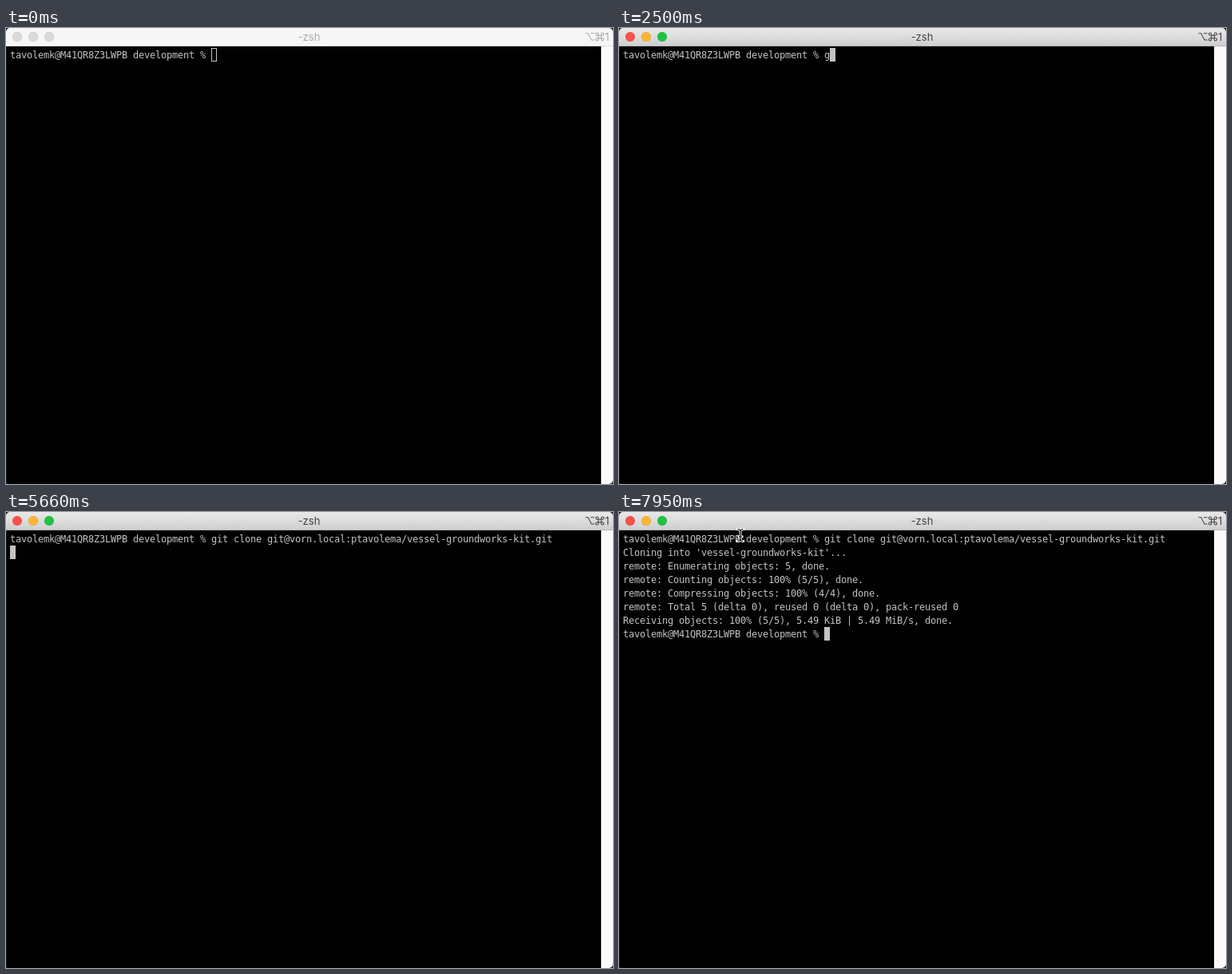
Animation, 760 px wide and 571 px high, one loop 8000 ms. Source, as an HTML page:

```html
<!DOCTYPE html>
<html lang="en">
<head>
<meta charset="utf-8">
<title>Terminal</title>
<style>
  html, body { margin: 0; width: 100%; height: 100%; overflow: hidden; background: #1c1c1c; }
  #win { position: absolute; inset: 0; width: 760px; height: 571px; overflow: hidden;
    background: #010101; border-radius: 5px; --ink: #a9a9a9; }
  #win.active { --ink: #434343; }
  #bar { position: absolute; left: 0; top: 0; width: 760px; height: 23px; box-sizing: border-box;
    background: #f6f6f6; border-bottom: 1px solid #dcdcdc; color: var(--ink);
    font: 13px/23px Inter, Roboto, sans-serif; }
  .active #bar { background: linear-gradient(#e9e9e9, #cfcfcf); border-color: #b4b4b4; }
  #bar i { position: absolute; top: 5px; width: 12px; height: 12px; border-radius: 50%;
    background: #dadada; left: calc(8px + 20px * var(--n)); box-shadow: inset 0 0 0 .5px #0002; }
  .active #bar i { background: var(--c); }
  #title { position: absolute; left: 0; width: 759px; text-align: center; }
  #bar svg { position: absolute; left: 0; top: 0; }
  #keys { fill: none; stroke: var(--ink); stroke-width: 1.05; }
  #keys text { fill: var(--ink); stroke: none; font: 13px Inter, Roboto, sans-serif; }
  #scroll { position: absolute; left: 745px; top: 23px; width: 14px; bottom: 0;
    background: #fafafa; border-left: 1px solid #e6e6e6; }
  #edge { position: absolute; left: 0; top: 23px; width: 1px; bottom: 0; background: #1d1d1d; }
  #screen { position: absolute; left: 5px; top: 26px; margin: 0; color: #c3c3c3; white-space: pre;
    font: 12px/17px "DejaVu Sans Mono", "Noto Sans Mono", monospace; font-variant-ligatures: none; }
  #screen span { display: inline-block; height: 16px; margin-top: -1px; padding-top: 1px;
    vertical-align: top; background: #c3c3c3; color: #000; }
  #caret { position: absolute; width: 7px; height: 17px; box-sizing: border-box; border: 1px solid #c3c3c3; }
  #caret.solid { background: #c3c3c3; }
  #mouse { position: absolute; left: -10px; top: -12px; fill: none; }
</style>
</head>
<body>
<div id="win">
  <pre id="screen"></pre>
  <div id="caret"></div>
  <div id="edge"></div>
  <div id="scroll"></div>
  <div id="bar">
    <i style="--n:0;--c:#fc504c"></i><i style="--n:1;--c:#fdb434"></i><i style="--n:2;--c:#1ec344"></i>
    <div id="title">-zsh</div>
    <svg width="760" height="22">
      <g id="keys">
        <path d="M725.5 6.8h3.3l4.2 8.2h3.8M732 6.8h4.8"/>
        <path d="M741.7 9.2v3.6M745.3 9.2v3.6M741.7 9.2h3.6M741.7 12.8h3.6
          M741.7 9.2h-1.6a1.6 1.6 0 1 1 1.6-1.6z M745.3 9.2v-1.6a1.6 1.6 0 1 1 1.6 1.6z
          M741.7 12.8v1.6a1.6 1.6 0 1 1-1.6-1.6z M745.3 12.8h1.6a1.6 1.6 0 1 1-1.6 1.6z"/>
        <text x="750" y="15.5">1</text>
      </g>
    </svg>
  </div>
  <svg id="mouse" width="20" height="24" viewBox="-10 -12 20 24">
    <defs><path id="beam" d="M-3.5-7.5Q0-7.5 0-4.5V4.5Q0 7.5-3.5 7.5M3.5-7.5Q0-7.5 0-4.5M0 4.5Q0 7.5 3.5 7.5M-2 2H2"/></defs>
    <use href="#beam" stroke="#fff" stroke-width="3" stroke-linecap="square"/>
    <use href="#beam" stroke="#000" stroke-width="1.2"/>
  </svg>
</div>
<script>
const LOOP = 8000, CELL = 7, ROW = 17;
const FOCUS = 1000, CARET_ON = 1200, PASTE = 4000, ENTER = 5660, PROMPT = 6330;
const repo = 'vessel-groundworks-kit';
const url = `git@vorn.local:ptavolema/${repo}.git`;
const prompt = 'tavolemk@M41QR8Z3LWPB development % ';
const command = 'git clone ';
const keyTimes = [2490, 2610, 2730, 2890, 3080, 3200, 3330, 3410, 3530, 3680];
const output = [
  [5790, `Cloning into '${repo}'...`],
  [6160, 'remote: Enumerating objects: 5, done.'],
  [6160, 'remote: Counting objects: 100% (5/5), done.'],
  [6200, 'remote: Compressing objects: 100% (4/4), done.'],
  [6250, 'remote: Total 5 (delta 0), reused 0 (delta 0), pack-reused 0'],
  [6250, 'Receiving objects: 100% (5/5), 5.49 KiB | 5.49 MiB/s, done.'],
];
// Pointer paths: [time, x, y]; the pointer hides while typing.
const paths = [
  { from: 540, to: 2490, points: [[540, 392, 500], [800, 368, 400], [1160, 347, 311], [1330, 347, 337]] },
  { from: 6830, to: LOOP, points: [[6830, 347, 337], [6900, 345, 345], [7000, 325, 320],
    [7290, 159, 70], [7500, 163, 32], [7750, 168, 22], [7950, 152, 29]] },
];

const $ = id => document.getElementById(id);
const win = $('win'), screen = $('screen'), caret = $('caret'), mouse = $('mouse');

// Fit the font's advance to the terminal cell grid.
function fitGrid() {
  const probe = document.createElement('span');
  probe.textContent = 'm'.repeat(100);
  screen.append(probe);
  screen.style.letterSpacing = CELL - probe.getBoundingClientRect().width / 100 + 'px';
  probe.remove();
}

function pointAt(points, t) {
  const next = points.findIndex(p => p[0] > t);
  if (next < 0) return points.at(-1).slice(1);
  const [t0, x0, y0] = points[next - 1], [t1, x1, y1] = points[next];
  const u = (t - t0) / (t1 - t0), k = u * u * (3 - 2 * u);
  return [x0 + (x1 - x0) * k, y0 + (y1 - y0) * k];
}

function linesAt(t) {
  const typed = command.slice(0, keyTimes.filter(k => k <= t).length);
  const lines = [prompt + typed + (t >= PASTE ? url : '')];
  if (t < ENTER) return lines;
  for (const [at, text] of output) if (t >= at) lines.push(text);
  lines.push(t >= PROMPT ? prompt : '');
  return lines;
}

let shown = '';
function drawText(t) {
  const lines = linesAt(t), selected = t >= PASTE && t < ENTER;
  const text = lines.join('\n'), key = selected + text;
  if (key !== shown) {
    shown = key;
    if (selected) {
      const mark = document.createElement('span');
      mark.textContent = url;
      screen.replaceChildren(prompt + command, mark);
    } else screen.textContent = text;
  }
  caret.style.left = 5 + lines.at(-1).length * CELL + 'px';
  caret.style.top = 25 + (lines.length - 1) * ROW + 'px';
  caret.className = t >= CARET_ON ? 'solid' : '';
}

function drawPointer(t) {
  const path = paths.find(p => t >= p.from && t < p.to);
  mouse.style.display = path ? '' : 'none';
  if (!path) return;
  const [x, y] = pointAt(path.points, t);
  mouse.style.transform = `translate(${Math.round(x)}px, ${Math.round(y)}px)`;
}

const start = performance.now();
function frame() {
  const t = (performance.now() - start) % LOOP;
  win.className = t >= FOCUS ? 'active' : '';
  drawText(t);
  drawPointer(t);
  requestAnimationFrame(frame);
}
fitGrid();
frame();
</script>
</body>
</html>
```
